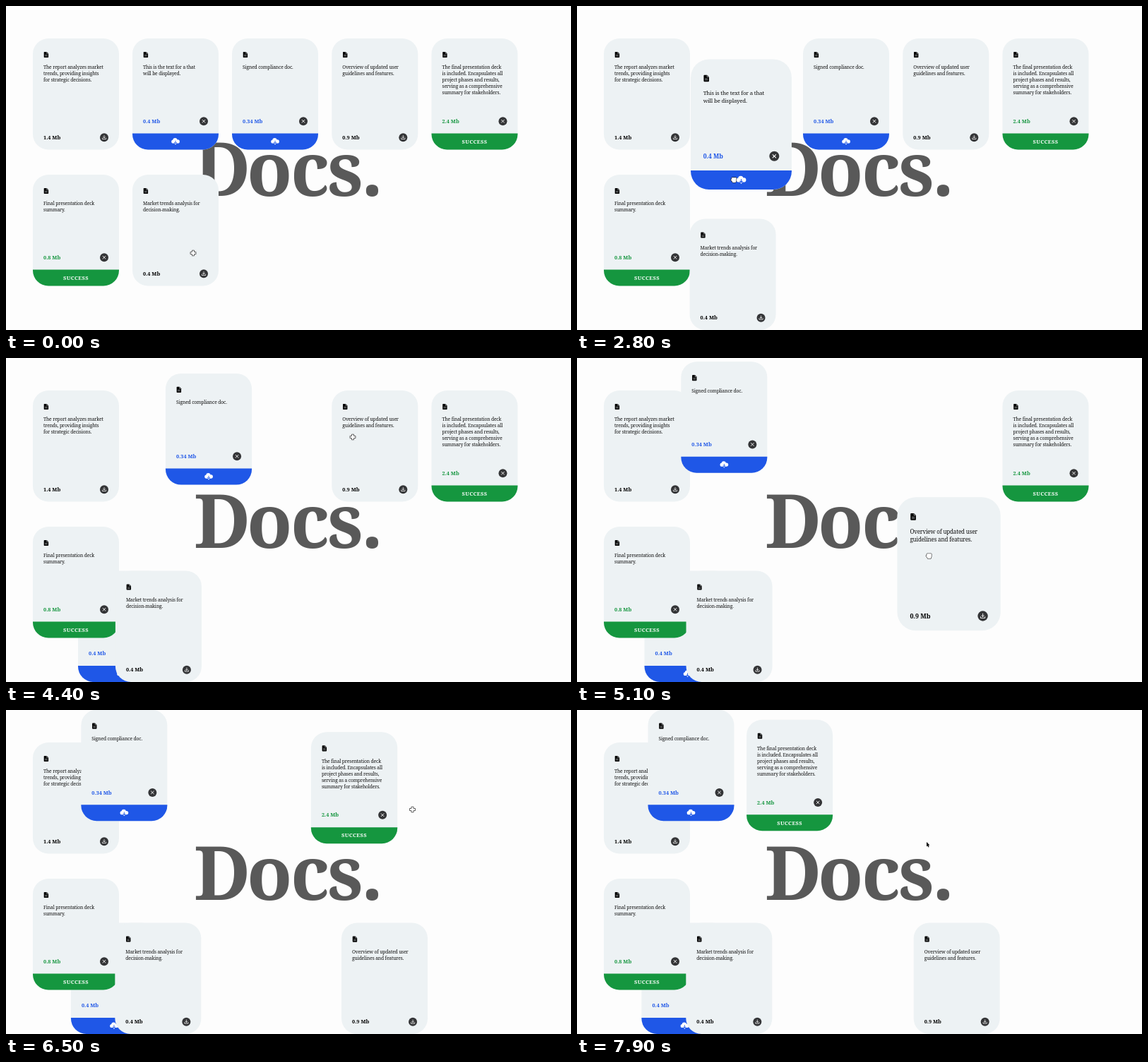
An HTML page with a canvas that plays this animation: 800 by 459 pixels, repeating every 8 s.

```html
<!DOCTYPE html>
<html lang="en">
<head>
<meta charset="utf-8">
<title>Docs</title>
<style>
html, body { margin: 0; width: 100%; height: 100%; overflow: hidden; background: #fdfdfd; }
canvas { display: block; width: 100vw; height: 100vh; }
</style>
</head>
<body>
<canvas id="stage"></canvas>
<script>
const W = 800, H = 459, LOOP = 8000, STEP = 100;
const CARD_W = 122, CARD_H = 157.5, FOOT = 135, MAX_Y = H - CARD_H, MIN_Y = -0.3;
const GRAB_SCALE = 0.2, SCALE_TAU = 0.07;
const BLUE = '#1f57e7', GREEN = '#15963f', DARK = '#343537';
const SERIF = '"Noto Serif", "Noto Sans", serif';

const canvas = document.getElementById('stage');
const ctx = canvas.getContext('2d');
const dpr = window.devicePixelRatio || 1;
canvas.width = W * dpr;
canvas.height = H * dpr;

// drag: [time, x, y] while held; to: where the inertia would carry the card
const cards = [
  { home: [38, 46], size: '1.4 Mb',
    lines: ['The report analyzes market', 'trends, providing insights', 'for strategic decisions.'] },
  { home: [179, 46], size: '0.4 Mb', color: BLUE,
    lines: ['This is the text for a that', 'will be displayed.'],
    drag: [[2.665, 179, 46], [2.8, 171.5, 89], [3, 160.5, 170]], to: [91.3, 507] },
  { home: [320, 46], size: '0.34 Mb', color: BLUE,
    lines: ['Signed compliance doc.'],
    drag: [[3.78, 320, 46], [4.05, 305.2, 38.9]], to: [99.5, -5], tau: 0.72 },
  { home: [461.3, 46], size: '0.9 Mb',
    lines: ['Overview of updated user', 'guidelines and features.'],
    drag: [[4.6, 461.3, 46], [5.3, 467.3, 279.8]], to: [477, 310] },
  { home: [602.5, 46], size: '2.4 Mb', color: GREEN, done: true,
    lines: ['The final presentation deck', 'is included. Encapsulates all', 'project phases and results,',
      'serving as a comprehensive', 'summary for stakeholders.'],
    drag: [[5.95, 602.5, 46], [6.2, 543.7, 41.8]], to: [205, 10.5] },
  { home: [38, 239], size: '0.8 Mb', color: GREEN, done: true,
    lines: ['Final presentation deck', 'summary.'] },
  { home: [179, 239], size: '0.4 Mb',
    lines: ['Market trends analysis for', 'decision-making.'],
    drag: [[0.95, 179, 239], [1.45, 186, 269]], to: [154.3, 558] }
];

const pointer = [
  [0.1, 265, 350], [0.85, 217, 314], [0.95, 217, 314], [1.45, 224, 344], [1.7, 224, 345],
  [2.6, 229.5, 203], [2.665, 229.5, 203], [2.8, 222, 246], [3, 211, 327], [3.7, 385, 112],
  [3.78, 385, 112], [4.05, 370, 105], [4.4, 491, 112], [4.6, 494, 113], [5.3, 500, 347],
  [5.8, 641, 146], [5.95, 641, 146], [6.2, 582, 142], [6.5, 575.5, 141], [7.35, 575.5, 141],
  [7.8, 495, 187]
];

function along(keys, t) {
  const i = keys.findIndex(k => k[0] > t);
  if (i === 0) return keys[0].slice(1);
  if (i < 0) return keys[keys.length - 1].slice(1);
  const a = keys[i - 1], b = keys[i], u = (t - a[0]) / (b[0] - a[0]);
  return [a[1] + (b[1] - a[1]) * u, a[2] + (b[2] - a[2]) * u];
}

// exponential glide that meets an overdamped spring at the stage edge
function glide(from, to, tau, t) {
  const p = to + (from - to) * Math.exp(-t / tau);
  const edge = to > MAX_Y ? MAX_Y : to < MIN_Y ? MIN_Y : null;
  if (edge === null) return p;
  const left = (to - edge) / (to - from);
  const hit = -tau * Math.log(left);
  if (t < hit) return p;
  const speed = (to - edge) / tau, s = t - hit;
  return edge + speed / 28.2 * (Math.exp(-5.86 * s) - Math.exp(-34.1 * s));
}

function pose(card, t) {
  const d = card.drag;
  if (!d || t < d[0][0]) return { x: card.home[0], y: card.home[1], scale: 1, held: false };
  const start = d[0][0], end = d[d.length - 1][0];
  const grow = s => GRAB_SCALE * (1 - Math.exp(-s / SCALE_TAU));
  if (t < end) {
    const [x, y] = along(d, t);
    return { x, y, scale: 1 + grow(t - start), held: true };
  }
  const [, x0, y0] = d[d.length - 1], tau = card.tau || 0.75, s = t - end;
  return {
    x: card.to[0] + (x0 - card.to[0]) * Math.exp(-s / tau),
    y: glide(y0, card.to[1], tau, s),
    scale: 1 + grow(end - start) * Math.exp(-s / SCALE_TAU),
    held: false
  };
}

function text(str, x, y, font, color, spacing = 0, align = 'left') {
  ctx.font = font + ' ' + SERIF;
  ctx.letterSpacing = spacing + 'px';
  ctx.textAlign = align;
  ctx.fillStyle = color;
  ctx.fillText(str, x, y);
}

function poly(points) {
  ctx.beginPath();
  points.forEach(([x, y]) => ctx.lineTo(x, y));
  ctx.closePath();
}

function strokes(color, width, ...paths) {
  ctx.strokeStyle = color;
  ctx.lineWidth = width;
  ctx.lineCap = ctx.lineJoin = 'round';
  ctx.beginPath();
  for (const path of paths) path.forEach(([x, y], i) => i ? ctx.lineTo(x, y) : ctx.moveTo(x, y));
  ctx.stroke();
}

function disc(x, y, r) {
  ctx.moveTo(x + r, y);
  ctx.arc(x, y, r, 0, Math.PI * 2);
}

function fileIcon(x, y) {
  poly([[x + 0.6, y], [x + 4, y], [x + 6.4, y + 2.4], [x + 6.4, y + 7.6], [x + 5.8, y + 8.2],
    [x + 0.6, y + 8.2], [x, y + 7.6], [x, y + 0.6]]);
  ctx.fillStyle = '#000';
  ctx.fill();
  strokes('#edf2f4', 0.5, [[x + 4, y + 0.6], [x + 4, y + 2.4], [x + 5.8, y + 2.4]]);
  strokes('#b8bcbe', 0.6, [[x + 1.7, y + 4.5], [x + 4.7, y + 4.5]], [[x + 1.7, y + 6.1], [x + 4.7, y + 6.1]]);
}

function button(x, y, cross) {
  ctx.fillStyle = DARK;
  ctx.beginPath();
  disc(x, y, 6);
  ctx.fill();
  if (cross) {
    strokes('#fff', 0.9, [[x - 1.9, y - 1.9], [x + 1.9, y + 1.9]], [[x + 1.9, y - 1.9], [x - 1.9, y + 1.9]]);
  } else {
    strokes('#fff', 0.75, [[x, y - 2.7], [x, y + 0.7]], [[x - 1.4, y - 0.6], [x, y + 0.8], [x + 1.4, y - 0.6]],
      [[x - 2.6, y + 0.9], [x - 2.6, y + 2.4], [x + 2.6, y + 2.4], [x + 2.6, y + 0.9]]);
  }
}

function cloud(x, y) {
  ctx.fillStyle = '#fff';
  ctx.beginPath();
  disc(x - 3.2, y + 0.4, 2.6);
  disc(x - 0.6, y - 1.5, 3.1);
  disc(x + 3.2, y + 0.3, 2.7);
  ctx.rect(x - 3.2, y - 0.5, 6.4, 3.5);
  ctx.fill();
  strokes('#fff', 1.6, [[x, y + 2], [x, y + 4]]);
  strokes(BLUE, 0.9, [[x, y - 0.4], [x, y + 3]], [[x - 1.5, y + 1.7], [x, y + 3.2], [x + 1.5, y + 1.7]]);
}

function drawCard(card, p) {
  ctx.save();
  ctx.translate(p.x + CARD_W / 2, p.y + CARD_H / 2);
  ctx.scale(p.scale, p.scale);
  ctx.translate(-CARD_W / 2, -CARD_H / 2);
  ctx.beginPath();
  ctx.roundRect(0, 0, CARD_W, CARD_H, 22);
  ctx.fillStyle = '#edf2f4';
  ctx.fill();
  if (card.color) {
    ctx.beginPath();
    ctx.roundRect(0, FOOT - 0.5, CARD_W, CARD_H - FOOT + 0.5, [0, 0, 22, 22]);
    ctx.fillStyle = card.color;
    ctx.fill();
    if (card.done) text('SUCCESS', 61, 148.8, 'bold 7.5px', '#fff', 0.3, 'center');
    else cloud(61, 145.6);
  }
  fileIcon(15.7, 18.9);
  card.lines.forEach((line, i) => text(line, 15, 43.3 + i * 9, '6.7px', '#111', -0.13));
  const row = card.color ? 117.2 : 140.2;
  text(card.size, 15, row + 2.7, 'bold 7.4px', card.color || '#000');
  button(101, row, !!card.color);
  ctx.restore();
}

function drawTitle() {
  const starts = [268, 345, 407, 458, 509];
  [...'Docs.'].forEach((ch, i) => {
    ctx.font = 'bold 105px ' + SERIF;
    ctx.letterSpacing = '0px';
    ctx.textAlign = 'left';
    const bearing = ctx.measureText(ch).actualBoundingBoxLeft;
    text(ch, starts[i] + bearing, 269, 'bold 105px', '#595959');
  });
}

function drawScrollbar(overflow) {
  ctx.fillStyle = '#fafafa';
  ctx.fillRect(794, 0, 6, H);
  ctx.fillStyle = '#e8e8e8';
  ctx.fillRect(794, 0, 0.6, H);
  ctx.fillStyle = '#c1c1c1';
  ctx.beginPath();
  ctx.roundRect(795.8, 1, 3.6, (H - 2) * H / (H + overflow), 1.8);
  ctx.fill();
}

function outline(fill, line, width) {
  ctx.lineWidth = width;
  ctx.lineJoin = 'round';
  ctx.strokeStyle = line;
  ctx.stroke();
  ctx.fillStyle = fill;
  ctx.fill();
}

function drawPointer(kind, x, y) {
  ctx.save();
  ctx.translate(x, y);
  if (kind === 'hand') {
    ctx.beginPath();
    ctx.moveTo(-3, -2.4);
    for (let i = 0; i < 4; i++) ctx.arc(-2.1 + i * 1.6, -2.2, 0.9, Math.PI, 0);
    ctx.lineTo(3.5, 1);
    ctx.quadraticCurveTo(3.2, 3, 2.4, 4);
    ctx.lineTo(-1.4, 4);
    ctx.quadraticCurveTo(-2.4, 2.2, -4, 0.5);
    ctx.quadraticCurveTo(-4, -0.6, -3, -0.4);
    ctx.closePath();
    outline('#fff', '#222', 1.2);
  } else if (kind === 'cross') {
    const a = 3.6, b = 1.2;
    poly([[-b, -a], [b, -a], [b, -b], [a, -b], [a, b], [b, b], [b, a], [-b, a], [-b, b], [-a, b], [-a, -b], [-b, -b]]);
    outline('#fff', '#333', 1.5);
  } else {
    poly([[0, 0], [0, 6.4], [1.4, 5.2], [2.5, 7.6], [3.6, 7.1], [2.6, 4.8], [4.4, 4.6]]);
    outline('#000', '#fff', 1);
  }
  ctx.restore();
}

function draw(t) {
  ctx.setTransform(dpr, 0, 0, dpr, 0, 0);
  ctx.fillStyle = '#fdfdfd';
  ctx.fillRect(0, 0, W, H);
  drawTitle();

  const poses = cards.map(c => pose(c, t));
  poses.forEach((p, i) => drawCard(cards[i], p));

  const overflow = Math.max(...poses.map(p => p.y + CARD_H * (1 + p.scale) / 2 - H));
  if (overflow > 0.12) drawScrollbar(overflow);

  const [x, y] = along(pointer, t);
  const over = poses.some(p => x > p.x && x < p.x + CARD_W && y > p.y && y < p.y + CARD_H);
  // the move cursor stays until the mouse itself moves again
  const stale = t >= 6.2 && t < 7.35;
  drawPointer(poses.some(p => p.held) ? 'hand' : over || stale ? 'cross' : 'arrow', x, y);
}

function frame() {
  const ms = performance.now() % LOOP;
  draw(Math.floor(ms / STEP) * STEP / 1000);
  requestAnimationFrame(frame);
}
frame();
</script>
</body>
</html>
```
